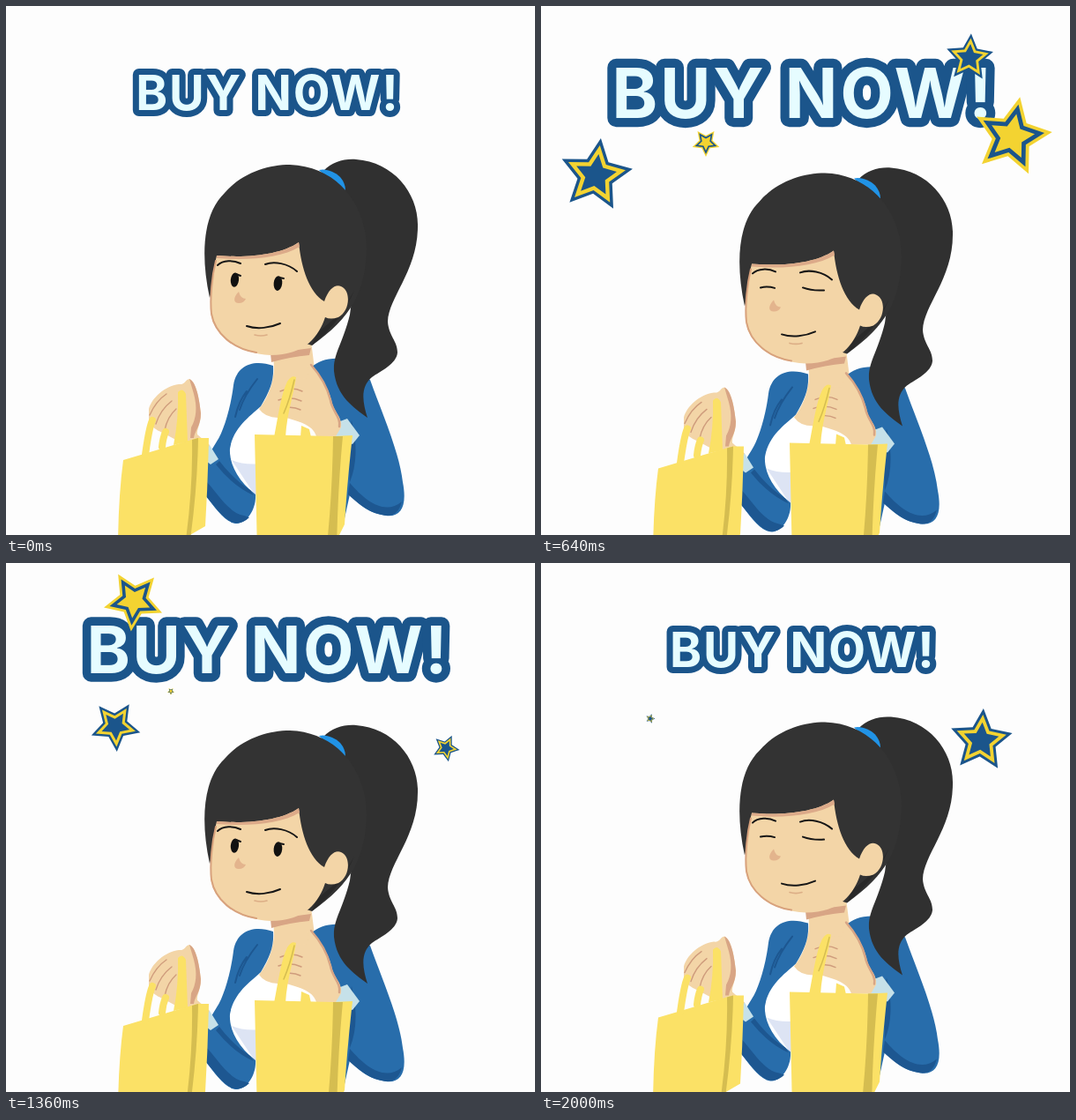
Recreate the animation shown at these times as an HTML page. Size 600x600 px, loop 2040 ms.

```html
<!DOCTYPE html>
<html lang="en">
<head>
<meta charset="utf-8">
<title>Buy now</title>
<style>
html, body { margin: 0; width: 100%; height: 100%; overflow: hidden; background: #fdfdfd; }
svg { display: block; width: 100vw; height: 100vh; }
text { font: 700 54.3px Inter, Roboto, sans-serif; letter-spacing: 1.8px; text-anchor: middle;
  fill: #e6fcff; stroke: #1b558b; stroke-width: 14; stroke-linejoin: round; paint-order: stroke; }
.line { fill: none; stroke-linecap: round; stroke-linejoin: round; }
.ink { stroke: #161616; stroke-width: 2; }
.fold { stroke: #cf9c7c; stroke-width: 1.4; }
.skin { fill: #f3d5a7; }
.shade { fill: #d8a585; }
.coat { fill: #286dab; }
.navy { fill: #1d5791; }
.cuff { fill: #c6e1e9; }
.bag { fill: #fbe166; }
.side { fill: #d5bd50; }
</style>
</head>
<body>
<svg viewBox="0 0 600 600">
  <g id="woman">
    <!-- torso -->
    <path fill="#fff" d="M292 450L345 440L345 600L290 600L283 556L252 520L256 478Z"/>
    <path fill="#dde4f4" d="M256 515Q270 521 290 519L290 556L281 553Z"/>
    <path class="skin" d="M303 385L346 380L350 412L345 455L318 466Q296 470 287 457Q302 438 304 412Z"/>
    <path class="shade" d="M300 394L346 388L344 396Q322 398 301 404Z"/>
    <path class="coat" d="M303 408C282 401 262 406 258 430C255 455 247 482 239 494L228 512L226 555C238 570 249 587 262 587C274 586 284 570 283 554C262 538 253 518 254 502C258 478 276 466 289 454C300 436 304 424 303 408Z"/>
    <path class="navy" d="M226 538C240 552 252 575 270 578L276 580Q268 588 258 586C246 582 236 566 226 555Z"/>
    <path class="navy" d="M242 516Q258 537 277 549L281 555Q258 545 238 520Z"/>
    <path class="line" stroke="#1d5791" stroke-width="2" d="M285 423Q270 442 265 458M273 437Q264 448 260 466"/>
    <path class="coat" d="M346 410C354 403 364 399 380 400L413 424C425 458 446 505 450 540C455 566 449 580 431 578C412 576 400 565 390 554L384 581L372 580L372 470Q365 440 346 410Z"/>
    <path class="navy" d="M390 541C408 562 430 578 449 562Q444 582 426 577C410 574 398 563 388 554Z"/>
    <path class="navy" d="M392 470Q402 510 390 540L388 490Z"/>

    <!-- hair -->
    <path fill="#303030" d="M360 187C370 177 383 173 397 174C440 177 468 213 467 250C467 300 434 330 433 358C434 374 444 380 444 393C443 406 425 414 415 421C402 432 404 448 410 467C394 455 375 443 372 414C371 394 382 383 390 350L398 290Z"/>
    <path fill="#2193e6" d="M355 186C363 184 373 188 379 194Q385 201 385 209L372 203Z"/>
    <path fill="#333" d="M231 331C220 280 224 235 248 212C268 189 297 180 322 180C378 182 409 228 409 275C408 324 392 353 347 385L300 370L240 300Z"/>
    <path fill="#292929" d="M395 322Q383 355 347 385L353 370Q382 350 395 322Z"/>

    <!-- face -->
    <path class="skin" d="M239 283C275 286 312 282 332 268C335 298 344 325 361 335C366 320 374 315 380 318C391 322 391 345 377 353Q368 356 362 353C355 374 340 396 300 396C262 394 236 374 232 348C231 325 235 300 239 283Z"/>
    <path fill="#dcaa89" d="M239 286C275 289 312 286 333 273L332 268C312 282 275 286 239 283Z"/>
    <path class="line" stroke="#d8a27d" stroke-width="2" d="M238 289C234 305 231 330 233 349C237 372 258 389 284 393"/>
    <path fill="#e3b48d" d="M264 324C257 331 258 337 264 337Q270 337 272 332Q266 332 264 324Z"/>
    <path class="line ink" d="M240 294C246 288 258 288 266 292M294 293C304 289 320 292 330 301"/>
    <path class="line ink" d="M273 363C285 367 300 365 311 360"/>
    <path class="line" stroke="#dcae86" stroke-width="1.6" d="M282 373Q289 375 296 373"/>
    <g id="open" fill="#111">
      <ellipse cx="259.5" cy="310.5" rx="4.6" ry="8.2" transform="rotate(6 259 310)"/>
      <ellipse cx="308.5" cy="314.5" rx="4.8" ry="8.4" transform="rotate(6 308 314)"/>
      <path class="line ink" d="M261 304L266 306M310 308L315 309"/>
    </g>
    <path id="shut" class="line ink" d="M249 310Q257 308 265 310.5M297 310Q308 314 321 313"/>

    <!-- left hand and bag -->
    <path class="cuff" d="M222 494L231 498L241 514L232 520L222 512Z"/>
    <path class="skin" d="M162 457C165 445 180 431 196 429C203 430 203 424 208 423C215 426 219 442 221 462C221 474 216 480 217 486L231 498L222 508L187 489C178 483 165 481 162 470Z"/>
    <path class="shade" d="M208 423C215 426 219 442 221 462C221 476 214 482 213 490L209 490L210 478Q219 462 213 440Z"/>
    <path class="line fold" d="M163 464Q170 448 182 440M170 474Q175 458 188 448M180 481Q183 466 193 457"/>
    <path class="bag" d="M133 515L217 490L230 490Q229 540 226 590L207 601L206 620L127 620Q127 560 133 515Z"/>
    <path class="side" d="M211 492L218 490Q217 550 208 612L203 612Q212 550 211 492Z"/>
    <path class="line" stroke="#fbe166" stroke-width="8" d="M158 509C160 495 162 479 166 470M177 500Q178 490 181 483"/>
    <path class="bag" d="M190 498Q196 468 195 438Q200 432 204 440L206 494Z"/>

    <!-- right hand and bag -->
    <path class="cuff" d="M379 471L387 468L401 487L393 497L370 489Z"/>
    <path class="skin" d="M308 440C313 430 325 420 340 423C346 416 339 409 345 405C353 415 365 430 369 447C371 460 382 466 380 478L374 488L352 488C348 474 330 471 312 465Q304 454 308 440Z"/>
    <path class="line" stroke="#d8a585" stroke-width="2.5" d="M346 407C354 416 364 431 368 447C370 460 380 466 378 477"/>
    <path class="line fold" d="M311 437Q324 431 336 437M309 447Q322 442 335 448M312 457Q324 453 334 458"/>
    <path class="bag" d="M282 486L371 488L393 487Q387 540 384 588L378 600V620H285Z"/>
    <path class="side" d="M371 488L382 488Q376 550 375 620H363Q370 560 371 488Z"/>
    <path class="bag" d="M304 489C309 464 312 440 319 426Q324 418 329 421C326 442 319 460 317 489ZM334 489L335 476L344 480L346 489Z"/>
    <path class="line" stroke="#d5bd50" stroke-width="1.5" d="M327 424Q322 446 315 462"/>
  </g>

  <g id="title"><text x=".8" y="19.5">BUY NOW!</text></g>
  <g id="stars"></g>
</svg>

<script>
const LOOP = 2040, STEP = 40, LIFE = 920, RISE = 12;
const BLUE = '#1b558b', GOLD = '#f3d331';
const $ = id => document.getElementById(id);

// Position, peak radius, angle at the peak and turn over the whole life
const stars = [
  { start: 40, x: 62, y: 194, r: 48, angle: 13, turn: -33 },
  { start: 120, x: 534, y: 149, r: 47, angle: 12, turn: -6, gold: true },
  { start: 400, x: 486, y: 56, r: 38, angle: -3, turn: -29 },
  { start: 480, x: 187, y: 151, r: 31, angle: 36, turn: 0, gold: true },
  { start: 800, x: 145, y: 44, r: 37, angle: 38, turn: 30, gold: true },
  { start: 1120, x: 124, y: 182, r: 40, angle: 27, turn: -23 },
  { start: 1280, x: 499, y: 205, r: 58, angle: 13, turn: -30 }
];

const ease = u => (1 - Math.cos(Math.PI * u)) / 2;
const swing = (t, t0, t1, a, b) => a + (b - a) * ease((t - t0) / (t1 - t0));

// A strong pulse, then a softer one
function titleScale(t) {
  if (t < 490) return swing(t, 0, 490, 1, 1.61);
  if (t < 840) return swing(t, 490, 840, 1.61, 1.2);
  if (t < 1580) return swing(t, 840, 1580, 1.2, 1.42);
  return swing(t, 1580, LOOP, 1.42, 1);
}

const starPoints = size => Array.from({ length: 10 }, (_, i) => {
  const r = size * (i % 2 ? .49 : 1), a = i * Math.PI / 5;
  return `${r * Math.sin(a)},${-r * Math.cos(a)}`;
}).join(' ');

$('stars').innerHTML = stars.map(({ gold }) => '<g>' + [1, .81, .57].map((size, i) =>
  `<polygon points="${starPoints(size)}" fill="${i % 2 == !!gold ? BLUE : GOLD}"/>`
).join('') + '</g>').join('');

function draw(t) {
  const bob = 15 * (1 - Math.abs(2 * t / LOOP - 1));
  $('woman').setAttribute('transform', `translate(0 ${bob})`);
  $('title').setAttribute('transform', `translate(296 98.5) scale(${titleScale(t)})`);

  const closed = t >= 640 && t < 1200 || t >= 1880;
  $('open').style.display = closed ? 'none' : '';
  $('shut').style.display = closed ? '' : 'none';

  stars.forEach(({ start, x, y, r, angle, turn }, i) => {
    const u = (t - start) / LIFE, g = $('stars').children[i];
    const size = u > 0 && u < 1 ? r * Math.sin(Math.PI * u) : 0;
    g.setAttribute('transform',
      `translate(${x} ${y - RISE * (u - .5)}) rotate(${angle + turn * (u - .5)}) scale(${size})`);
  });
}

const begin = performance.now();
function tick() {
  const t = (performance.now() - begin) % LOOP;
  draw(Math.floor(t / STEP) * STEP);
  requestAnimationFrame(tick);
}
tick();
</script>
</body>
</html>
```
